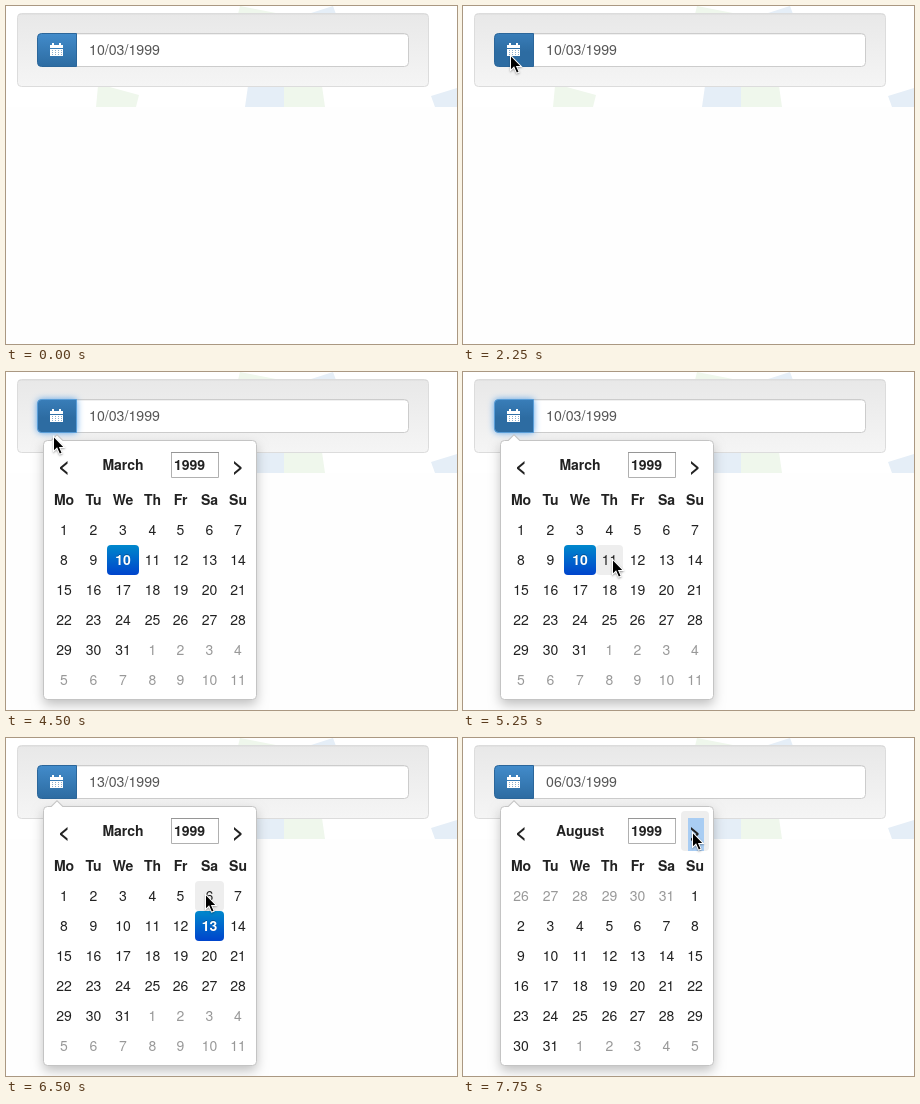
These frames come from a looping animation (451x338 px, 8 s). An HTML page with a canvas:

```html
<!DOCTYPE html>
<html lang="en">
<head>
<meta charset="utf-8">
<title>Date picker</title>
<style>
html, body { margin: 0; width: 100%; height: 100%; overflow: hidden; background: #fff; }
canvas { display: block; }
</style>
</head>
<body>
<canvas id="stage" width="451" height="338"></canvas>
<script>
const ctx = document.getElementById('stage').getContext('2d');
const LOOP = 8000;
const FONT = '"Helvetica Neue", "Liberation Sans", Arial, sans-serif';
const COLUMNS = [44, 73, 101, 133, 160, 189, 218, 246];
const CENTERS = [58, 87.5, 117, 146.5, 174.5, 203.5, 232];
const DAYS = ['Mo', 'Tu', 'We', 'Th', 'Fr', 'Sa', 'Su'];
const MONTHS = ['January', 'February', 'March', 'April', 'May', 'June', 'July', 'August'];

// Each step changes only the listed values; hover is [column, row].
const STEPS = [
  [0, { cursor: null, day: 10, month: 2, open: false, dark: false, focus: false, hover: null, next: false, marked: false }],
  [250, { cursor: [162, 132] }],
  [500, { cursor: [107, 67] }],
  [750, { cursor: [55, 40] }],
  [1000, { cursor: [52, 39] }],
  [1250, { cursor: [48, 56] }],
  [2250, { cursor: [48, 50], dark: true }],
  [2500, { cursor: [48, 52], open: true, focus: true }],
  [3500, { cursor: [48, 50] }],
  [4000, { open: false }],
  [4500, { cursor: [48, 65], open: true }],
  [4750, { cursor: [283, 220] }],
  [5000, { cursor: [170, 188], hover: [5, 1] }],
  [5250, { cursor: [150, 188], hover: [3, 1] }],
  [5500, { dark: false, focus: false }],
  [5750, { cursor: [165, 191], day: 11, hover: [4, 1] }],
  [6000, { cursor: [196, 191], day: 12, hover: [5, 1] }],
  [6250, { cursor: [199, 192], day: 13 }],
  [6500, { cursor: [200, 157], hover: [5, 0] }],
  [6750, { cursor: [198, 157], day: 6 }],
  [7000, { cursor: [230, 95], hover: null, next: true }],
  [7250, { month: 3 }],
  [7500, { month: 5, marked: true }],
  [7750, { month: 7 }]
];

function stateAt(time) {
  return Object.assign({}, ...STEPS.filter(([start]) => start <= time).map(([, change]) => change));
}

function polygon(color, ...points) {
  ctx.beginPath();
  for (let i = 0; i < points.length; i += 2) ctx.lineTo(points[i], points[i + 1]);
  ctx.closePath();
  ctx.fillStyle = color;
  ctx.fill();
}

function box(x, y, w, h, radius, fill, border) {
  const inset = border ? 0.5 : 0;
  ctx.beginPath();
  ctx.roundRect(x + inset, y + inset, w - 2 * inset, h - 2 * inset, radius);
  ctx.fillStyle = fill;
  ctx.fill();
  ctx.shadowColor = 'transparent';
  if (border) {
    ctx.lineWidth = 1;
    ctx.strokeStyle = border;
    ctx.stroke();
  }
}

function rect(color, x, y, w, h) {
  ctx.fillStyle = color;
  ctx.fillRect(x, y, w, h);
}

function vertical(top, bottom, from, to) {
  const gradient = ctx.createLinearGradient(0, top, 0, bottom);
  gradient.addColorStop(0, from);
  gradient.addColorStop(1, to);
  return gradient;
}

function shadow(color, blur, offset) {
  ctx.shadowColor = color;
  ctx.shadowBlur = blur;
  ctx.shadowOffsetY = offset;
}

function text(label, x, y, color = '#222', weight = 'normal', size = 14, align = 'center') {
  ctx.font = `${weight} ${size}px ${FONT}`;
  ctx.textAlign = align;
  ctx.fillStyle = color;
  ctx.fillText(label, x, y);
}

function drawPage() {
  rect('#fff', 0, 0, 451, 101);
  rect('#fefefe', 0, 101, 451, 237);
  const green = '#eff7ec', blue = '#e5eef7';
  polygon(green, 234, 0, 275, 8, 232, 8);
  polygon(blue, 302, 8, 327, 0, 330, 8);
  polygon(green, 92, 80, 100, 80, 133, 89, 130, 101, 90, 101);
  polygon(blue, 242, 80, 278, 80, 278, 101, 239, 101);
  polygon(green, 278, 80, 316, 80, 319, 101, 278, 101);
  polygon(blue, 425, 90, 451, 82, 451, 101, 429, 101);
  box(11, 7, 412, 74, 4, vertical(7, 81, '#e8e8e8', '#f5f5f5'), '#dcdcdc');
  rect('rgba(0,0,0,.03)', 13, 8, 408, 1);
}

function drawIcon() {
  rect('#fff', 44, 39, 13, 3);
  rect('#fff', 46, 37, 2, 3);
  rect('#fff', 53, 37, 2, 3);
  rect('#fff', 44, 43, 13, 7);
  for (let x = 46; x < 56; x += 3) {
    for (let y = 44; y < 50; y += 2) rect('rgba(45,108,162,.55)', x, y, 1, 1);
  }
}

function drawField(state) {
  box(69, 27, 334, 34, [0, 4, 4, 0], '#fff', '#ccc');
  rect('rgba(0,0,0,.06)', 71, 28, 330, 1);
  text(String(state.day).padStart(2, '0') + '/03/1999', 83, 49, '#555', 'normal', 14.2, 'left');
  if (state.focus) shadow('#4a9ae6', 7, 0);
  const fill = state.dark ? vertical(13, 46, '#428bca', '#2d6ca2') : vertical(28, 60, '#428bca', '#2d6ca2');
  box(31, 27, 40, 34, [4, 0, 0, 4], fill, state.focus ? '#5a9ed8' : '#2b669a');
  drawIcon();
}

function drawDays(state) {
  const first = new Date(Date.UTC(1999, state.month, 1));
  const lead = (first.getUTCDay() + 6) % 7;
  for (let i = 0; i < 42; i++) {
    const col = i % 7, row = Math.floor(i / 7);
    const date = new Date(Date.UTC(1999, state.month, 1 + i - lead));
    const inMonth = date.getUTCMonth() === state.month;
    const day = date.getUTCDate();
    const selected = inMonth && state.month === 2 && day === state.day;
    const hovered = state.hover && state.hover[0] === col && state.hover[1] === row;
    const x = COLUMNS[col], y = 143 + row * 30, w = COLUMNS[col + 1] - x;
    if (selected) {
      box(x, y, w, 30, 4, vertical(y, y + 30, '#0088cc', '#0044cc'));
      text(day, CENTERS[col], y + 19, 'rgba(0,0,0,.25)', 'bold');
    } else if (hovered) {
      box(x, y, w, 30, 4, '#eee');
    }
    text(day, CENTERS[col], y + 20, selected ? '#fff' : inMonth ? '#222' : '#999', selected ? 'bold' : 'normal');
  }
}

function drawPicker(state) {
  shadow('rgba(0,0,0,.25)', 12, 5);
  box(37, 68, 214, 260, 4, '#fff', '#c4c4c4');
  polygon('#c4c4c4', 44, 69, 51, 62, 58, 69);
  polygon('#fff', 45, 69.5, 51, 63.5, 57, 69.5);
  if (state.next) box(218, 73, 28, 40, 4, '#eee');
  if (state.marked) rect('#a9cdf3', 225, 80, 16, 33);
  text('<', 58, 101, '#222', 'bold', 20);
  text('>', 232, 101, '#222', 'bold', 20);
  text(MONTHS[state.month], 117, 98, '#222', 'bold');
  box(165, 80, 48, 26, 0, '#fff', '#b0b0b0');
  rect('#969696', 165, 80, 48, 1);
  text('1999', 168, 98, '#222', 'bold', 14, 'left');
  DAYS.forEach((name, i) => text(name, CENTERS[i], 133, '#222', 'bold'));
  drawDays(state);
}

function drawCursor([x, y]) {
  ctx.save();
  ctx.translate(x, y);
  shadow('rgba(0,0,0,.35)', 2, 1);
  polygon('#fff', -1, -2, -1, 15.5, 2.8, 12.2, 5.3, 17.8, 8.8, 16.4, 6.4, 11, 11.6, 11);
  ctx.shadowColor = 'transparent';
  polygon('#000', 0, 0.4, 0, 13.2, 3.1, 10.3, 5.8, 16.5, 7.5, 15.8, 4.9, 9.9, 9.2, 9.9);
  ctx.restore();
}

function render() {
  const state = stateAt(performance.now() % LOOP);
  drawPage();
  drawField(state);
  if (state.open) drawPicker(state);
  if (state.cursor) drawCursor(state.cursor);
  requestAnimationFrame(render);
}
render();
</script>
</body>
</html>
```
